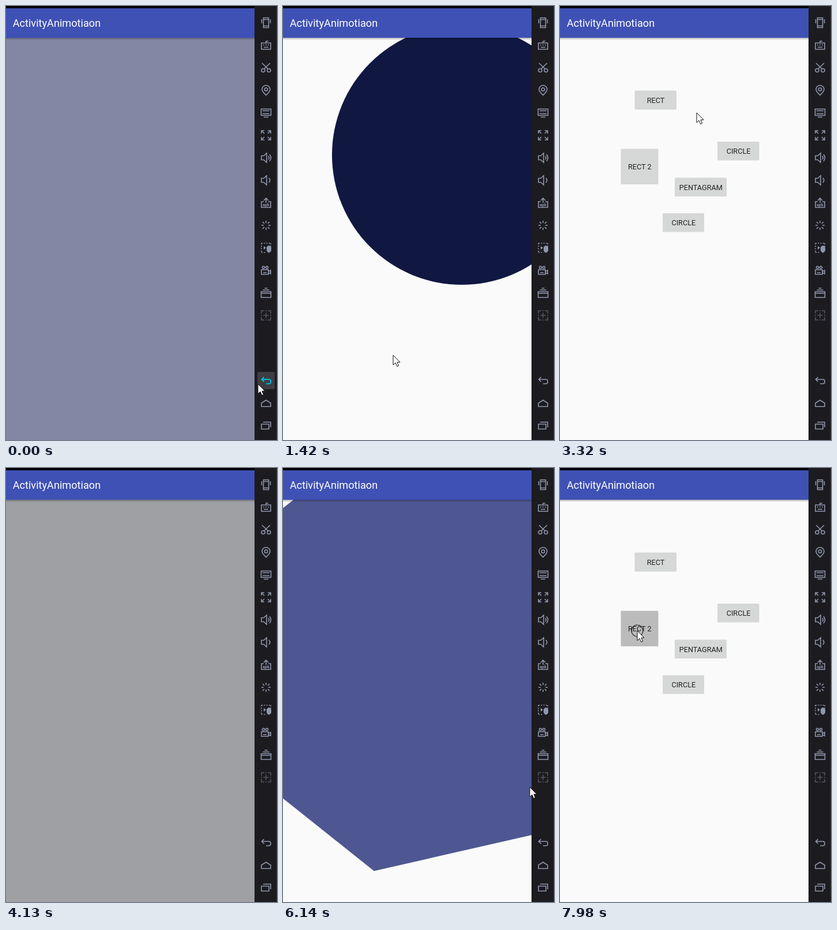
An HTML page for the animation above (8 s loop, 470 by 752 pixels).

```html
<!DOCTYPE html>
<html lang="en">
<head>
<meta charset="utf-8">
<title>Reveal transitions</title>
<style>
  html, body { margin: 0; width: 100%; height: 100%; overflow: hidden; background: #000; }
  svg { display: block; width: 100vw; height: 100vh; }
  text { font-family: Roboto, sans-serif; }
  .icons { fill: none; stroke: #9097ac; stroke-width: 1.6; }
  .icons text { fill: #9097ac; stroke: none; font-weight: 700; }
</style>
</head>
<body>
<svg viewBox="0 0 470 752">
  <defs>
    <clipPath id="content"><rect y="55" width="431" height="697"/></clipPath>
    <linearGradient id="shade" x2="0" y2="1">
      <stop offset="0" stop-opacity=".3"/><stop offset="1" stop-opacity="0"/>
    </linearGradient>
  </defs>
  <rect width="431" height="752" fill="#fafafa"/>
  <g id="buttons"></g>
  <path id="reveal" clip-path="url(#content)"/>
  <rect y="55" width="431" height="4" fill="url(#shade)"/>
  <rect width="431" height="4" fill="#000"/>
  <rect y="4" width="431" height="51" fill="#3f51b5"/>
  <text x="11.7" y="36" font-size="18.15" fill="#fff">ActivityAnimotiaon</text>
  <rect x="431" width="39" height="752" fill="#1c1b20"/>
  <rect x="469" width="1" height="752" fill="#2b2a30"/>
  <rect id="hover" x="436" y="634" width="30" height="30" rx="2" fill="#3d3d43"/>
  <g id="icons" class="icons"></g>
  <circle id="ring" r="10" fill="none" stroke="#222" stroke-width="1.2"/>
  <path id="cursor" d="M0 0V17L4 13.2L6.8 19.5L9.6 18.3L6.9 12.2H12Z" fill="#fff" stroke="#111"/>
</svg>
<script>
const LOOP = 8000, GROW = 800, REACH = 819;
const $ = id => document.getElementById(id);

function add(parent, tag, attrs, text) {
  const el = document.createElementNS('http://www.w3.org/2000/svg', tag);
  for (const k in attrs) el.setAttribute(k, attrs[k]);
  if (text) el.textContent = text;
  parent.append(el);
  return el;
}

// Buttons: label, box, press time
const buttons = [
  ['RECT', 129.5, 146.5, 72.5, 33, -1000],
  ['CIRCLE', 273, 235, 72.5, 32.5, 1010],
  ['RECT 2', 105.5, 247.5, 65, 61.5, 7860],
  ['PENTAGRAM', 199, 297.5, 90, 32.5, 5730],
  ['CIRCLE', 178, 359, 72, 32.5, 3540]
].map(([label, x, y, width, height, press]) => {
  const box = add($('buttons'), 'rect', { x, y, width, height, rx: 1.5 });
  add($('buttons'), 'text', {
    x: x + width / 2 + .3, y: y + height / 2 + 4.8,
    'font-size': 12.7, 'text-anchor': 'middle', fill: '#222'
  }, label);
  return { box, press };
});

// Toolbar icons, drawn around their own centre
const icons = [
  [29, 'M-4.5 -8.5H4.5V8.5H-4.5ZM-4.5 -5.5H4.5M-4.5 5.5H4.5M-7.5 -6V1M7.5 -6V1'],
  [68, 'M-8 -4H8V7H-8ZM0 -4V-7H4M-5 -.5H-3M-1 -.5H1M3 -.5H5M-4 3.5H4'],
  [107, 'M-7 -8L3.5 2M7 -8L-3.5 2M-8 4.5a3 3 0 1 0 6 0a3 3 0 1 0 -6 0M2 4.5a3 3 0 1 0 6 0a3 3 0 1 0 -6 0'],
  [146, 'M0 8.5C-4 4.5 -7 2 -7 -1.5A7 7 0 0 1 7 -1.5C7 2 4 4.5 0 8.5ZM-2.7 -1.5a2.7 2.7 0 1 0 5.4 0a2.7 2.7 0 1 0 -5.4 0'],
  [185, 'M-8.5 -6.5H8.5V4.5H-8.5ZM-6 -3.5H6M-6 1.5H6M-4 7.5H4'],
  [224, 'M-8 -3V-8H-3M3 -8H8V-3M8 3V8H3M-3 8H-8V3M-7 -7L-3 -3M7 -7L3 -3M7 7L3 3M-7 7L-3 3'],
  [263, 'M-8 -3.5H-4L1 -8V8L-4 3.5H-8ZM4 -3Q6.5 0 4 3M6 -6Q11 0 6 6'],
  [302, 'M-8 -3.5H-4L1 -8V8L-4 3.5H-8ZM5 -4Q8.5 0 5 4'],
  [341, 'M-4 -2H-8V8H8V-2H4M0 0V-7M-4 -4L0 -8L4 -4'],
  [380, 'M0 -8V-4M0 4V8M-8 0H-4M4 0H8M-6 -6L-3 -3M6 6L3 3M-6 6L-3 3M6 -6L3 -3'],
  [419, 'M-8 -8H9M-8 8H0M-8 -8V8M8 -8V-2', '2 2.3'],
  [458, 'M-8 -1H4V7H-8ZM4 2L8 0V6L4 4M-6.5 -5a2 2 0 1 0 4 0a2 2 0 1 0 -4 0M-.5 -5a2 2 0 1 0 4 0a2 2 0 1 0 -4 0M-5 4H1'],
  [497, 'M-8.5 -2H8.5V8H-8.5ZM-5.5 -5H5.5M-2.5 -8H2.5M-8 .7H8'],
  [536, 'M-8 -3V-8H-3M3 -8H8V-3M8 3V8H3M-3 8H-8V3M-8 -1V1M8 -1V1M-1 -8H1M-1 8H1M0 -4.5V4.5M-4.5 0H4.5'],
  [649, 'M-3.5 -6L-7.5 -2L-3.5 2M-7.5 -2H5Q8 -2 8 1V2.5Q8 5.5 5 5.5H0'],
  [689, 'M-8 5V-1L0 -6L8 -1V5Z'],
  [727, 'M-8 -2.5H5V6H-8ZM-5 -6H8V3']
].map(([y, d, dash]) => add($('icons'), 'path', {
  d, transform: `translate(451 ${y})`, 'stroke-dasharray': dash || 'none'
}));
icons[13].setAttribute('stroke', '#55555f');
icons[13].style.stroke = '#55555f';
const backIcon = icons[14];
add($('icons'), 'text', { x: 451, y: 346.5, 'font-size': 7, 'text-anchor': 'middle' }, 'apk');
add($('icons'), 'path', { d: 'M452 420V418Q456 412 460 418V424Q456 431 452 424ZM447 416L451 419L447 422Z', style: 'fill:#9097ac;stroke:none' });

// Screens: colour, centre, corner count (0 = circle), opening start, closing end
const screens = [
  ['#8387a3', 166, 170, 4, -2000, 770],
  ['#101842', 310, 258, 0, 1140, 3040],
  ['#9fa0a4', 214, 383, 0, 3654, 5556],
  ['#4e5791', 244, 321, 7, 5755, 7676]
];

function outline(x, y, n, r) {
  if (!n) return `M${x - r} ${y}a${r} ${r} 0 1 0 ${2 * r} 0a${r} ${r} 0 1 0 ${-2 * r} 0Z`;
  const turn = n === 4 ? Math.PI / 4 : 0;
  const size = n === 4 ? r * Math.SQRT2 : r;
  const points = Array.from({ length: n }, (_, i) => {
    const a = turn + i * 2 * Math.PI / n;
    return `${x + size * Math.cos(a)} ${y + size * Math.sin(a)}`;
  });
  return `M${points.join('L')}Z`;
}

// Pointer stops: time, x, y
const stops = [
  [0, 437, 655], [60, 437, 655], [770, 305, 251], [1080, 305, 251],
  [1420, 191, 605], [1780, 345, 640], [2010, 448, 638], [2560, 448, 638],
  [3020, 351, 420], [3300, 240, 165], [3520, 212, 374], [3720, 212, 374],
  [4130, 482, 600], [4430, 482, 655], [4600, 448, 645], [4780, 448, 645],
  [5020, 379, 545], [5550, 236, 314], [5780, 236, 314], [6140, 428, 553],
  [6370, 428, 605], [6520, 428, 605], [6750, 448, 645], [6930, 448, 645],
  [7320, 330, 460], [7680, 134, 282], [8000, 134, 282]
];

const clamp = v => Math.max(0, Math.min(1, v));
const ease = v => (1 - Math.cos(Math.PI * clamp(v))) / 2;

function pointer(t) {
  const i = stops.findIndex(s => s[0] > t);
  const [t0, x0, y0] = stops[i - 1], [t1, x1, y1] = stops[i];
  const k = (t - t0) / (t1 - t0);
  return [x0 + (x1 - x0) * k, y0 + (y1 - y0) * k];
}

function draw(t) {
  const screen = screens.find(s => t >= s[4] && t < s[5]);
  if (screen) {
    const [color, x, y, n, start, end] = screen;
    const r = REACH * ease(Math.min(t - start, end - t) / GROW);
    $('reveal').setAttribute('d', outline(x, y, n, r));
    $('reveal').setAttribute('fill', color);
  } else {
    $('reveal').setAttribute('d', '');
  }

  let pressed = false;
  for (const { box, press } of buttons) {
    const age = t - press;
    const k = age < 0 ? 0 : Math.min(clamp((age + 40) / 120), clamp((500 - age) / 200));
    const shade = Math.round(214 - 27 * k);
    box.setAttribute('fill', `rgb(${shade},${shade + 1 - Math.round(k)},${shade + 1 - Math.round(k)})`);
    if (age >= 0 && age < 150) pressed = true;
  }

  const [x, y] = pointer(t);
  const at = `translate(${Math.round(x)} ${Math.round(y)})`;
  $('cursor').setAttribute('transform', at);
  $('ring').setAttribute('transform', at);
  $('ring').style.display = pressed ? '' : 'none';

  const over = x >= 436 && x <= 466 && y >= 634 && y <= 664;
  $('hover').style.display = over ? '' : 'none';
  backIcon.style.stroke = over ? '#00bcd4' : '';
  backIcon.style.strokeWidth = over ? 2 : '';
}

const begin = performance.now();
function tick() {
  draw((performance.now() - begin) % LOOP);
  requestAnimationFrame(tick);
}
tick();
</script>
</body>
</html>
```
